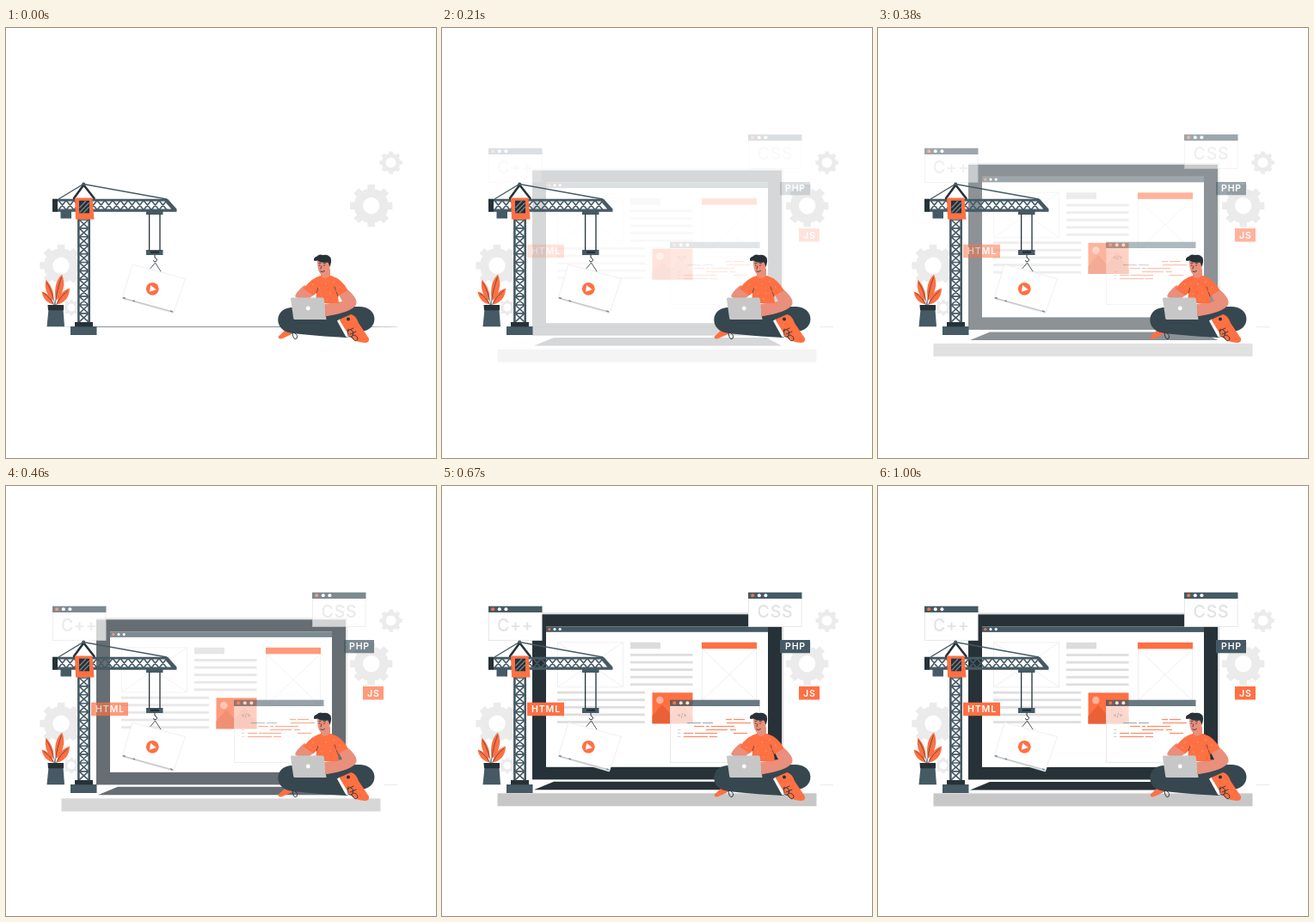
Animation, 500 px wide and 500 px high, one loop 1040 ms. Source, as an HTML page:

```html
<!DOCTYPE html>
<html lang="en">
<head>
<meta charset="utf-8">
<title>Building a website</title>
<style>
  html, body { margin: 0; width: 100%; height: 100%; overflow: hidden; background: #fff; }
  svg { display: block; width: 100%; height: 100%; }
  text { font-family: Inter, Roboto, sans-serif; }
  .title { font-size: 19.5px; font-weight: 500; letter-spacing: .8px; fill: #e2e2e2; text-anchor: middle; }
  .tag { font-size: 10.6px; font-weight: 600; letter-spacing: .8px; fill: #fff; text-anchor: middle; }
  .slate { fill: #455a64; }
  .dark { fill: #263238; }
  .orange { fill: #ff7043; }
  .skin { fill: #e98f7b; }
  .line { fill: none; stroke: #455a64; }
  .ink { fill: none; stroke: #263238; stroke-linecap: round; stroke-linejoin: round; }
  .wire { fill: none; stroke: #ebebeb; stroke-width: .8; }
</style>
</head>
<body>
<svg viewBox="0 0 500 500">
  <defs>
    <linearGradient id="floorFade" gradientUnits="userSpaceOnUse" x1="68" x2="455" y1="0" y2="0">
      <stop offset="0" stop-color="#263238" stop-opacity=".2"/>
      <stop offset=".1" stop-color="#263238"/>
      <stop offset=".88" stop-color="#263238"/>
      <stop offset="1" stop-color="#263238" stop-opacity=".1"/>
    </linearGradient>
  </defs>

  <g id="gears" fill="#ebebeb" fill-rule="evenodd"></g>
  <path d="M440 347.6H455" stroke="#e3e5e6" stroke-width=".8"/>
  <rect id="floor" x="68" y="347.3" width="387" height=".55" fill="url(#floorFade)"/>

  <g id="computer">
    <path d="M100 344H398L435 358H64Z" fill="#fdfdfd"/>
    <rect x="64.500" y="358" width="371" height="15" fill="#c7c7c7"/>
    <path d="M130 344.500H377L395 354H107Z" class="dark"/>
    <rect x="105" y="148" width="292" height="194" fill="#dcdcdc"/>
    <rect x="105" y="150" width="290" height="192" class="dark"/>
    <rect x="121" y="164" width="258" height="163.500" fill="#fff"/>
    <rect x="121" y="164" width="258" height="6.500" class="slate"/>
    <g id="screenDots"></g>
    <path class="wire" d="M134.500 182.500H210.500V234.500H134.500ZL210.500 234.500M210.500 182.500L134.500 234.500M302.500 190V250H365.500V190L302.500 250M302.500 190L365.500 250"/>
    <rect x="219" y="182.500" width="35" height="7.500" fill="#dcdcdc"/>
    <g id="copy" fill="#dedede"></g>
    <rect x="302" y="182.500" width="64" height="7.500" class="orange"/>
    <rect x="244.500" y="241" width="47" height="36" class="orange"/>
    <circle cx="253.300" cy="249.700" r="4.300" fill="#ffb199"/>
    <path d="M244.500 268L256 255L266 266L277 251L291.500 270V277H244.500Z" fill="#ea6138"/>
  </g>

  <g id="windows">
    <g id="frames"></g>
    <text class="title" x="85.300" y="168.800">C++</text>
    <text class="title" x="387.500" y="152.800">CSS</text>
    <text x="273.500" y="268.500" font-size="6.500" fill="#9a9a9a">&lt;/&gt;</text>
    <g id="code"></g>
    <rect x="393" y="179" width="35" height="15.300" class="slate"/>
    <text class="tag" x="411" y="190.300">PHP</text>
    <rect x="99" y="251.700" width="43" height="15.500" class="orange"/>
    <text class="tag" x="121" y="263.200">HTML</text>
    <rect x="415" y="233" width="24" height="15.500" class="orange"/>
    <text class="tag" x="427.400" y="244.500">JS</text>
  </g>

  <g id="crane">
    <path id="lattice" class="line" stroke-width="1.600"/>
    <path class="line" stroke-width="2.600" d="M84.400 222V343M96.700 222V343"/>
    <path class="slate" d="M60 198.700H187V201.600H60ZM60 210.400H198V213.800H60ZM185 198.700H188L198.500 210.500V213.800H195L185 202Z"/>
    <path class="dark" d="M54 198.700H60V213.800H54Z"/>
    <path class="slate" d="M63.500 213H76V221.500H63.500ZM75 347H105.500V357H75Z"/>
    <path class="dark" d="M80 342H101V347.300H80Z"/>
    <path class="line" stroke-width="1.300" d="M61 199L90 181.500L187 199"/>
    <path class="ink" stroke-width="2.600" d="M79 198L90.300 182.500L102.500 198"/>
    <circle cx="90.200" cy="181.500" r="2" class="slate"/>
    <path class="orange" d="M80 197.500H100.500L102.500 222.500H81Z"/>
    <path class="dark" d="M85 200.700H97V215.300H85Z"/>
    <path stroke="#78878e" stroke-width="1.200" d="M85.500 209L93 201M85.500 214.500L96.800 203M90 215L96.800 208"/>
    <path class="slate" d="M163 213H182.500V217H163ZM163 258H182.500V264H163Z"/>
    <path class="ink" stroke-width="1.300" d="M166.600 217V258M179 217V258"/>
    <path class="dark" d="M168 259.500H178V262H168Z"/>
    <path class="ink" stroke-width="1" d="M173 264V267Q177 269 174.500 271.500Q172 273 171.500 270.500"/>
    <path class="ink" stroke-width=".8" d="M168 279.500L173.500 273L180 283"/>
    <path d="M147 275L208.500 291.500L194.500 332L135 314.500Z" fill="#fff" stroke="#e8e8e8" stroke-width=".7"/>
    <path d="M135.500 314L194.500 330.300" stroke="#c4c8ca" stroke-width="1.500"/>
    <path d="M136 313.500L139 314.400M147.500 317L150 317.700M191 329L194 329.900" stroke="#7c8a91" stroke-width="1.500"/>
    <circle cx="170.300" cy="303.300" r="7.400" class="orange"/>
    <path d="M168.200 299L174.800 304.300L166.800 306.700Z" fill="#fff"/>
  </g>

  <g id="plant">
    <path class="orange" d="M54.500 317C57 309 53 300 46.500 292.500C44 303 48 312 54.500 317ZM58 317C56 306 57 294 65 286.500C70 298 66 311 58 317ZM55.500 321.500C53 313 48 308 41.500 306.500C43 315 48 320 55.500 321.500ZM59 321.500C60 312 66 305 74 302.500C74 313 68 320 59 321.500Z"/>
    <path class="ink" stroke-width=".6" d="M57 322Q54 307 47.500 296M57 322Q59 304 64.500 290M56 322Q51 313 44 308.500M58 322Q64 311 71.500 305.500"/>
    <path class="slate" d="M49.500 327H66.500L68 347.300H47.500Z"/>
    <path class="dark" d="M48.500 322H67V328.300H49Z"/>
  </g>

  <g id="person">
    <path class="orange" d="M327 349L317 358.500Q315.500 361.500 320 361.500L327 358.500L334 355Z"/>
    <path fill="#37474f" d="M340 324H412C434 325 434 352 412 353L396 360C375 359 348 357 331 354.500C312 352 311 327 331 325Z"/>
    <path class="ink" stroke-width=".9" d="M333 354Q334 364 338 361Q340 357 336 355"/>
    <path class="skin" d="M347 299Q338 306 336 312L346 319L360 309Z"/>
    <path class="skin" d="M385 306L397 304Q410 315 407 322Q401 331 372 335L370 321L391 318Z"/>
    <path class="orange" d="M366 288Q356 290 346 303L357 311L361 308L360 320H387L386 312L397.500 305Q391 292 378 288Z"/>
    <path class="skin" d="M366 282V288Q370 294 377 287.500V280Z"/>
    <path class="skin" d="M362 270Q362 285 367.500 287Q376 286 377 276V268H364Z"/>
    <path class="dark" d="M358.500 271Q356.500 267 361.500 265.500Q364 262.500 368.500 264Q374 262.500 377.500 267Q379 272 376.500 277.500L374.500 272.500Q366 273.500 362.500 270.500Z"/>
    <path class="ink" stroke-width=".8" d="M364.800 275.500V276.500M370 275.500V276.500M366.800 277L366 280M365.800 283Q368 284.500 370.500 282.500M364 273.500L366 273.300M369 273.200L371.500 273.800"/>
    <path class="ink" stroke-width=".6" d="M361 308L363 302M386 312L382 301"/>
    <g id="shirtDots" fill="#ffc2ad"></g>
    <path d="M332.500 313.500H368Q369.500 313.500 369.700 315L372.500 339H336Q334.500 339 334.200 337.500L331 315Q331 313.500 332.500 313.500Z" fill="#c7c7c7"/>
    <circle cx="351.300" cy="326" r="2.400" fill="#fff"/>
    <path class="skin" d="M371 326L378 328L381 333L371 335.500Z"/>
    <path d="M376 338Q386 334 391 337L397 358L394 360Z" fill="#37474f"/>
    <path d="M385 340.500L388 338.500L400 358L395.500 359.500Z" fill="#fff"/>
    <path class="orange" d="M387.500 339L401 333Q407 334 410 343L422 361Q423 366 417 366Q405 365 399 358Z"/>
    <circle cx="398" cy="338.500" r="2" class="dark"/>
    <path class="ink" stroke-width=".9" d="M397 352L404 349M400 356L407 353M398 350Q396 361 402 359Q406 353 401 351M402 359Q406 367 409 362Q409 357 403 357"/>
  </g>
</svg>
<script>
const LOOP = 1040, FRAME = 1000 / 24, RISE = 20, REST = -.6;
const byId = id => document.getElementById(id);

const rect = (x, y, w, h, fill) =>
  `<rect x="${x}" y="${y}" width="${w}" height="${h}"${fill ? ` fill="${fill}"` : ""}/>`;
const dot = (x, y, r, fill) =>
  `<circle cx="${x}" cy="${y}" r="${r}"${fill ? ` fill="${fill}"` : ""}/>`;
const dots = (x, y, gap, r) =>
  [0, 1, 2].map(i => dot(x + i * gap, y, r, i ? "#fff" : "#ff7043")).join("");

function gear(cx, cy, radius, hole) {
  const points = [];
  const add = (r, a) => points.push(`${cx + r * Math.cos(a)} ${cy + r * Math.sin(a)}`);
  for (let i = 0; i < 8; i++) {
    const a = i * Math.PI / 4;
    add(radius * .79, a - .22);
    add(radius, a - .17);
    add(radius, a + .17);
    add(radius * .79, a + .22);
    add(radius * .81, a + Math.PI / 8);
  }
  return `<path d="M${points.join("L")}ZM${cx - hole} ${cy}a${hole} ${hole} 0 1 0 ${2 * hole} 0a${hole} ${hole} 0 1 0 ${-2 * hole} 0Z"/>`;
}

function browser(x, y, w, h, barOpacity, bodyOpacity) {
  return `<rect x="${x + .4}" y="${y + 7}" width="${w - .8}" height="${h - 7}" fill="#fff" fill-opacity="${bodyOpacity}" stroke="#e3e3e3" stroke-width=".8"/>`
    + `<g opacity="${barOpacity}">${rect(x, y, w, 7.3, "#455a64")}${dots(x + 5.2, y + 3.6, 7.6, 2)}</g>`;
}

byId("gears").innerHTML = gear(424.7, 206.7, 25, 9.7) + gear(447.6, 156.6, 13.4, 6)
  + gear(64, 276.3, 25, 9.7) + gear(76, 325, 9.5, 4.5);
byId("screenDots").innerHTML = dots(124.8, 167.2, 6.2, 1.6);
byId("copy").innerHTML = [0, 1, 2, 3, 4].map(i =>
  rect(219, 195.7 + i * 8.6, 72.5, 2.8) + rect(134, 239.4 + i * 8.6, 102, 2.8)).join("");
byId("frames").innerHTML = browser(54, 139.7, 62.5, 39.8, 1, 1)
  + browser(356, 123.7, 62.5, 39.8, 1, 1)
  + browser(265, 248.7, 104.5, 72.8, .8, .75);

const ORANGE = "#ff8a65", GREY = "#a3adb1";
const codeRows = [
  [[330, 337], [339, 352]],
  [[285, 301, GREY], [303, 315, GREY], [331, 359]],
  [[293, 305], [307, 311], [313, 340]],
  [[307, 332], [335, 342]],
  [[281, 292], [294, 320], [339, 355]],
  [[281, 309], [311, 320]]
];
byId("code").innerHTML = codeRows.map((row, i) => {
  const y = 270.9 + i * 4;
  return row.map(([a, b, color = ORANGE]) => rect(a, y, b - a, 1.2, color)).join("")
    + (i > 2 ? rect(274, y, 3.5, 1, "#d0d0d0") : "");
}).join("");

let lattice = "";
for (let y = 223; y < 340; y += 9.9) lattice += `M85 ${y}L96 ${y + 9.9}M96 ${y}L85 ${y + 9.9}M85 ${y}H96`;
for (let x = 61; x < 184; x += 9) lattice += `M${x} 200.500L${x + 9} 211.500M${x + 9} 200.500L${x} 211.500`;
byId("lattice").setAttribute("d", lattice);

byId("shirtDots").innerHTML = [[357, 298], [364, 302], [372, 298], [381, 295], [388, 301],
  [367, 309], [377, 308], [374, 315], [354, 304], [384, 306]].map(([x, y]) => dot(x, y, .6)).join("");

// cubic-bezier(.36, -.01, .5, 1.38): eases in and overshoots at the end
function ease(x) {
  const curve = (s, a, b) => 3 * s * (1 - s) * ((1 - s) * a + s * b) + s ** 3;
  let low = 0, high = 1;
  for (let i = 0; i < 30; i++) {
    const mid = (low + high) / 2;
    if (curve(mid, .36, .5) < x) low = mid; else high = mid;
  }
  return curve(low, -.01, 1.38);
}

function draw(time) {
  const step = Math.min(24, Math.floor((time + 5) / FRAME));
  const progress = ease(step ? Math.min(1, step / 24 + .02) : 0);
  const opacity = Math.max(0, Math.min(1, progress));
  byId("computer").setAttribute("opacity", opacity);
  byId("computer").setAttribute("transform", `translate(0 ${REST + RISE * (1 - progress)})`);
  byId("windows").setAttribute("opacity", opacity);
  byId("floor").setAttribute("opacity", Math.max(0, 1 - 5 * opacity));
}

const start = performance.now();
function tick() {
  draw((performance.now() - start) % LOOP);
  requestAnimationFrame(tick);
}
tick();
</script>
</body>
</html>
```
